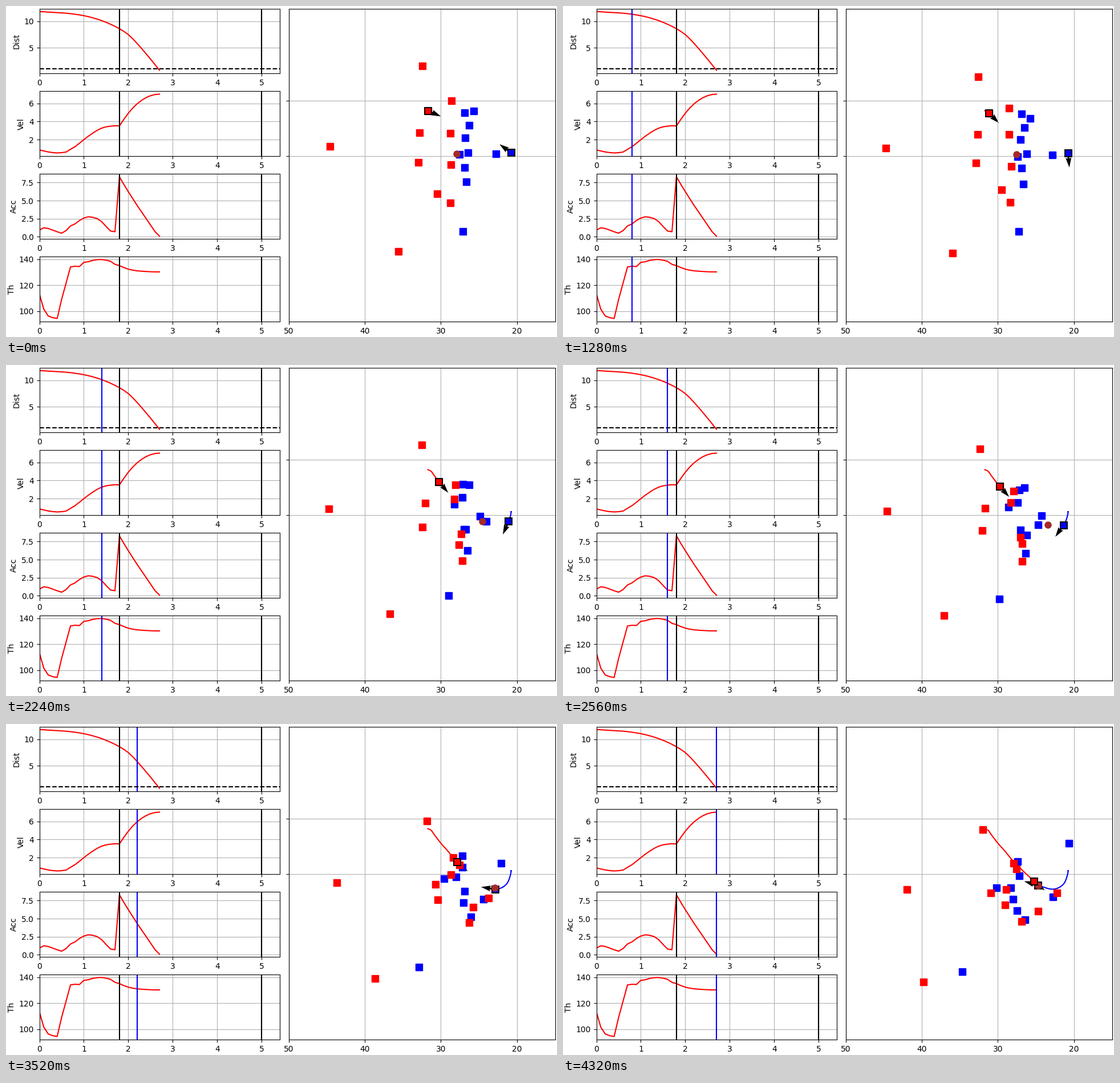
These frames come from a looping animation (966x580 px, 4480 ms). A matplotlib script:

```python
import numpy as np
import matplotlib.pyplot as plt
from matplotlib.animation import FuncAnimation

W, H, DPI = 966, 580, 100
FRAMES, INTERVAL = 28, 160
DT = 0.1
KEYS = [0, 4, 8, 11, 16, 22, 27]
steps = np.arange(FRAMES)
times = steps * DT

dist = [11.88, 11.82, 11.76, 11.71, 11.66, 11.61, 11.55, 11.47, 11.36, 11.23,
        11.08, 10.9, 10.68, 10.43, 10.15, 9.83, 9.46, 9.06, 8.62, 8.1,
        7.5, 6.7, 5.8, 4.85, 3.85, 2.85, 1.8, 0.74]
vel = [0.86, 0.75, 0.64, 0.57, 0.53, 0.56, 0.63, 0.93, 1.22, 1.6,
       2.0, 2.38, 2.72, 3.03, 3.27, 3.42, 3.49, 3.54, 3.52, 4.25,
       4.92, 5.5, 5.97, 6.35, 6.65, 6.86, 6.99, 7.03]
acc = [0.93, 1.25, 1.15, 0.93, 0.7, 0.5, 0.86, 1.5, 1.78, 2.25,
       2.6, 2.77, 2.7, 2.52, 2.1, 1.43, 0.8, 0.7, 8.3, 7.25,
       6.25, 5.28, 4.33, 3.43, 2.53, 1.63, 0.72, 0.1]
theta = [113.3, 101.5, 96.3, 95, 94.4, 109, 121.5, 134, 134.5, 134.3,
         137.5, 138, 139, 139.6, 139.7, 139.2, 138.3, 136, 135, 133.5,
         132.3, 131.5, 131, 130.7, 130.5, 130.3, 130.2, 130.2]


def smooth(values, keys=KEYS):
    """Cubic Hermite curve through the key values, sampled at every step."""
    k, v = np.array(keys, float), np.array(values, float)
    slope = np.gradient(v, k)
    j = np.clip(np.searchsorted(k, steps, side="right") - 1, 0, len(k) - 2)
    h = k[j + 1] - k[j]
    u = (steps - k[j]) / h
    return ((1 + 2 * u) * (1 - u) ** 2 * v[j] + u * (1 - u) ** 2 * h * slope[j]
            + u * u * (3 - 2 * u) * v[j + 1] - u * u * (1 - u) * h * slope[j + 1])


def path(xs, ys, keys=KEYS):
    return np.column_stack([smooth(xs, keys), smooth(ys, keys)])


fig = plt.figure(figsize=(W / DPI, H / DPI), dpi=DPI, facecolor="white")


def pixel_axes(left, top, right, bottom):
    return fig.add_axes([left / W, 1 - bottom / H, (right - left) / W, (bottom - top) / H])


# Time charts
cursors = []


def chart(row, label, data, ylim, ticks):
    top = 4.5 + 144.9 * row
    ax = pixel_axes(58.5, top, 479.5, top + 113.8)
    ax.plot(times, data, color="red")
    ax.set_xlim(0, 5.4)
    ax.set_ylim(*ylim)
    ax.set_yticks(ticks)
    ax.set_ylabel(label)
    ax.grid(True)
    for t in (1.8, 5):
        ax.axvline(t, color="black")
    cursors.append(ax.axvline(0, color="blue"))
    return ax


dist_ax = chart(0, "Dist", dist, (0.12, 12.43), [5, 10])
dist_ax.axhline(1, color="black", ls="--")
chart(1, "Vel", vel, (0.17, 7.35), [2, 4, 6])
chart(2, "Acc", acc, (-0.29, 8.7), [0, 2.5, 5, 7.5])
chart(3, "Th", theta, (92.0, 141.9), [100, 120, 140])

# Field, measured in stage pixels
field = pixel_axes(495.8, 4.5, 962.5, 553)
field.set_xlim(495.8, 962.5)
field.set_ylim(553, 4.5)
field.set_xticks([495.8 + 400 / 3 * i for i in range(4)], ["50", "40", "30", "20"])
field.set_yticks([165.5, 262.5], ["", ""])
field.grid(True)

runner_keys = [0, 4, 8, 11, 16, 18, 22, 27]
runner = path([739.5, 742.5, 746.5, 751, 765.5, 772, 790.5, 825.5],
              [183.5, 184.5, 187.5, 194, 212.5, 219.5, 241.5, 275.5], runner_keys)
carrier = path([885.5, 885.5, 885.5, 884.5, 877.5, 857.5, 832.5],
               [257, 257, 258, 264, 280.5, 289.5, 282.5])
ball = path([790, 790, 795, 812, 849.5, 868, 856.5, 832.5],
            [259, 259, 260, 265, 280, 287, 287, 282.5],
            [0, 4, 8, 11, 16, 19, 22, 27])
runner_angle = 90 - np.array(theta)
carrier_angle = smooth([144, 117, 275, 258, 235, 171, 164])
carrier_angle[4:9] = np.linspace(117, 275, 5)

trails = []
for way, color in ((carrier, "blue"), (runner, "red")):
    line, = field.plot([], [], color=color, lw=1.5)
    trails.append((line, way))

movers = []


def mover(way, color, marker="s", edge=None, mew=1.0):
    dot, = field.plot([], [], ls="", marker=marker, ms=8, color=color,
                      mec=edge or color, mew=mew)
    movers.append((dot, way))


def blue(xs, ys):
    mover(path(xs, ys), "blue")


def red(xs, ys, keys=KEYS):
    mover(path(xs, ys, keys), "red")


blue([804, 804, 804, 802, 800, 800, 800], [187, 187, 189, 197, 219, 251, 265.5])
blue([820, 820, 819, 817, 809, 799.5, 796.5], [183.5, 193, 197, 202.5, 215, 230.5, 241])
blue([812, 811, 809, 805, 796.5, 789, 785], [208.5, 209.5, 212.5, 221, 240.5, 267.5, 287])
blue([805, 804, 801.5, 794.5, 781, 767.5, 760], [231, 231, 233.5, 238.5, 249, 270.5, 287])
blue([810, 810, 813, 820, 839, 868, 886.5], [257, 257, 259, 262, 264, 243.5, 208.5])
blue([795, 795.5, 797, 798.5, 813, 837, 859], [260, 260, 264, 271.5, 297.5, 306.5, 302.5])
blue([858.5, 858.5, 857.5, 852.5, 833, 804, 788.5], [259, 260, 261, 266.5, 279.5, 293, 306.5])
blue([804, 804, 804, 804, 802, 802, 795.5], [283, 283, 284, 288, 289, 313, 326.5])
blue([807, 807, 807, 807, 811, 815, 810], [308, 308, 312, 318, 329.5, 338, 343])
blue([801, 801, 799, 790.5, 764.5, 724, 700], [395, 395, 395, 398, 409.5, 426, 433.5])

red([730, 729, 728, 728, 731, 737.5, 735.5], [105, 114.5, 123.5, 131, 146.5, 170, 185])
red([781, 781, 782, 785, 790, 794.5, 795], [166, 168, 178.5, 192, 221, 246.5, 254])
red([724.5, 726, 727, 729, 740, 753, 750], [222, 223, 225, 230.5, 251, 281, 295.5])
red([779, 779, 782, 785, 785, 780, 777], [223, 223, 225, 229, 240.5, 264, 290])
red([567.5, 566.5, 565.5, 565.5, 567.5, 580, 603], [246, 248, 249, 248, 256, 278, 290])
red([723, 723, 724, 725, 735, 757, 775], [274, 274, 275, 276, 290, 308, 317])
red([780, 781, 786, 792, 802, 818.5, 833], [278, 278, 281, 287, 302, 320.5, 328])
red([756, 762, 768.5, 779, 805, 845.5, 866], [329, 325.5, 321.5, 318.5, 313, 305, 295.5])
red([779, 780, 784, 791, 805, 812, 804], [345, 345, 344, 342, 344, 347.5, 345.5])
red([688, 684.5, 682.5, 679.5, 668, 647, 632], [430, 432, 433, 433.5, 438.5, 446, 452])
# The recorded runner leaves the simulated one at 1.8 s
red([739.5, 742.5, 746.5, 751, 765.5, 772, 784, 789.5],
    [183.5, 184.5, 187.5, 194, 212.5, 219.5, 233.5, 244], runner_keys)

mover(carrier, "blue", edge="black", mew=1.4)
mover(ball, "brown", marker="o")
mover(runner, "red", edge="black", mew=1.4)

heading = np.radians(np.column_stack([carrier_angle, runner_angle]))
arrows = field.quiver([0, 0], [0, 0], [1, 1], [0, 0], color="black", angles="uv",
                      units="width", width=0.0073, scale_units="dots", scale=1 / 25)


def draw(i):
    for cursor in cursors:
        cursor.set_xdata([times[i]] * 2)
    for line, way in trails:
        line.set_data(way[:i + 1, 0], way[:i + 1, 1])
    for dot, way in movers:
        dot.set_data(way[i:i + 1, 0], way[i:i + 1, 1])
    arrows.set_offsets([carrier[i], runner[i]])
    arrows.set_UVC(np.cos(heading[i]), np.sin(heading[i]))


anim = FuncAnimation(fig, draw, frames=FRAMES, init_func=lambda: draw(0),
                     interval=INTERVAL, repeat=True, repeat_delay=0, blit=False)
plt.show()
```
